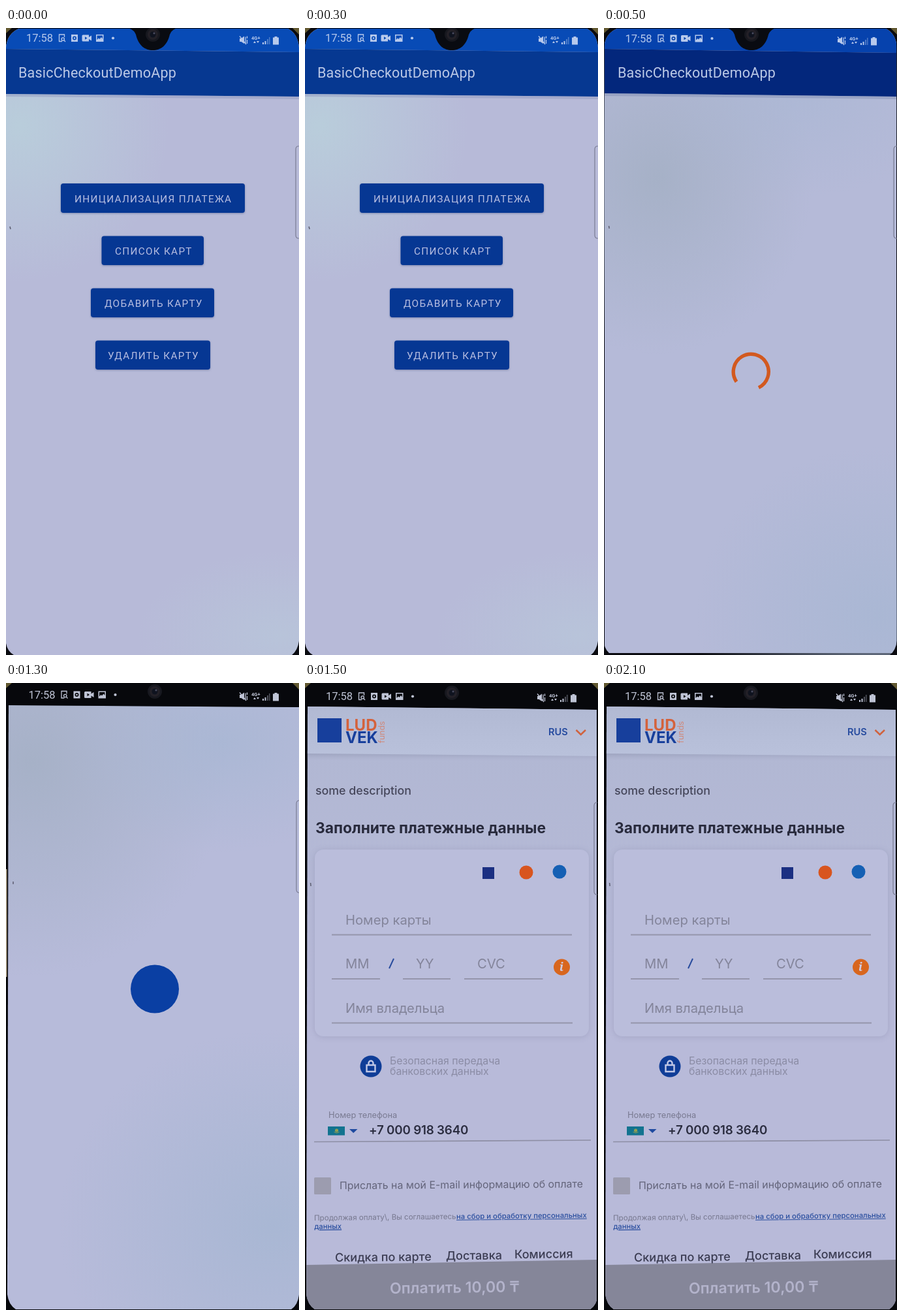
An HTML page that plays this animation: 449 px wide and 960 px high, repeating every 2500 ms.

```html
<!DOCTYPE html>
<html lang="ru">
<head>
<meta charset="utf-8">
<title>Checkout demo</title>
<style>
html, body { margin: 0; width: 100%; height: 100%; overflow: hidden; background: #07080c; }
svg { display: block; width: 100%; height: 100%; }
text { font-family: Inter, "Open Sans", sans-serif; white-space: pre; }
.ui { font-family: Roboto, "Noto Sans", sans-serif; }
.scene { visibility: hidden; animation: short 2.5s step-end infinite; }
.loading { animation-delay: .5s; }
.splash { animation-delay: 1s; }
.form { animation-name: long; animation-delay: 1.5s; }
@keyframes short { 0% { visibility: visible; } 20% { visibility: hidden; } }
@keyframes long { 0% { visibility: visible; } 40% { visibility: hidden; } }
.title { font-size: 21.5px; letter-spacing: .2px; fill: #bcc9e7; }
.btn rect { fill: #063793; filter: drop-shadow(0 1px 1.5px #4a5a8a88); }
.btn text { font-size: 15.3px; letter-spacing: 1.3px; fill: #b9bfe2; }
.field text { font-size: 20.2px; fill: #83849a; }
.field path { stroke: #9595ab; stroke-width: 2; fill: none; }
.tabs text { font-size: 18.1px; font-weight: 500; fill: #3b3c52; }
.speck { stroke: #5c5d70; stroke-width: 1.5; }
</style>
</head>
<body>
<svg viewBox="0 0 449 960" preserveAspectRatio="none">
  <defs>
    <clipPath id="screen"><path d="M20 1H432Q447 8 449 30V938Q447 953 438 960H12Q2 954 0 942V30Q2 8 20 1Z"/></clipPath>
    <clipPath id="inset"><path d="M4 33H449V936Q447 953 437 959H15Q4 952 2 936Z"/></clipPath>
    <radialGradient id="glow"><stop offset="0" stop-color="#b9cddb"/><stop offset="1" stop-color="#b9cddb" stop-opacity="0"/></radialGradient>
    <radialGradient id="grey"><stop offset="0" stop-color="#a6b1c7"/><stop offset="1" stop-color="#a6b1c7" stop-opacity="0"/></radialGradient>
    <radialGradient id="cool"><stop offset="0" stop-color="#a5b6d2"/><stop offset="1" stop-color="#a5b6d2" stop-opacity="0"/></radialGradient>
    <linearGradient id="page" x2="0" y2="1"><stop offset="0" stop-color="#b0b7d2"/><stop offset=".5" stop-color="#b8bad9"/></linearGradient>
    <linearGradient id="bar" x2="0" y2="1"><stop offset="0" stop-color="#b1b9d3"/><stop offset="1" stop-color="#b9c1db"/></linearGradient>
    <linearGradient id="fade" x2="0" y2="1"><stop offset="0" stop-color="#8f95b0"/><stop offset="1" stop-color="#b7bad8" stop-opacity="0"/></linearGradient>

    <g id="left">
      <text class="ui" x="31" y="21" font-size="16.5" fill="currentColor">17:58</text>
      <g fill="none" stroke="currentColor" stroke-width="1.3">
        <path d="M86 20.5H81.5V10H89.5V14"/><circle cx="87.2" cy="17" r="2.2"/><path d="M88.8 18.6L91 21"/>
      </g>
      <g fill="currentColor" fill-rule="evenodd">
        <path d="M100 10H110V21H100ZM105 12.5A3 3 0 1 0 105 18.5A3 3 0 1 0 105 12.5Z"/><circle cx="105" cy="15.5" r="1.3"/>
        <path d="M118 10.5H127V14L131 11.5V19.5L127 17V20.5H118Q116.5 20.5 116.5 19V12Q116.5 10.5 118 10.5ZM121 13.3V17.7L124.5 15.5Z"/>
        <path d="M138 10H149.5V21H138ZM139.5 11.5V18L142 15.5L143.5 17L146 14L148 16.5V11.5Z"/>
        <circle cx="164" cy="15.5" r="2.1"/>
      </g>
    </g>
    <g id="right" fill="currentColor">
      <path d="M358 16H360.5L365 12.5V24L360.5 21H358Z"/>
      <path d="M358 12.5L368 25M367 13.5V23M369.5 12.5V16M369.5 18V24" stroke="currentColor" stroke-width="1.3"/>
      <text class="ui" x="376" y="18" font-size="7.5" font-weight="700">4G+</text>
      <path d="M379 23L381 20L383 23ZM384 20H388L386 23Z"/>
      <path d="M393 25V22H395V25ZM396.5 25V20H398.5V25Z"/>
      <path d="M400 25V17H402V25ZM403 25V14H404.5V25Z" opacity=".4"/>
      <path d="M411.5 13H415.5V14.5H418V25.5H409V14.5H411.5Z"/>
    </g>
    <g id="camera"><circle r="11" fill="#17181f"/><circle r="8" fill="#232027"/><circle r="4.5" fill="#0f131f"/><circle cx="2" cy="-2" r="1.5" fill="#4b4d61"/></g>
    <path id="notch" d="M186 0Q196 2 199 10C203 27 213 34 225 34S247 27 251 10Q254 2 263 0Z" fill="#090b11"/>
    <path id="edge" d="M449 181H447Q444 182 444 186V317Q444 321 447 322H449" fill="none" stroke="#7b7d94" stroke-width="1.2"/>
    <path id="corners" d="M0 0H9L0 8ZM449 0H439L449 10Z" fill="#635a32"/>
  </defs>

  <g class="scene menu">
    <rect width="449" height="960" fill="#0a0b10"/><use href="#corners"/>
    <g clip-path="url(#screen)">
      <rect width="449" height="960" fill="#b7bad8"/>
      <ellipse cx="20" cy="150" rx="230" ry="240" fill="url(#glow)"/>
      <ellipse cx="420" cy="930" rx="220" ry="130" fill="url(#glow)" opacity=".5"/>
      <path d="M0 0H449V37L0 32Z" fill="#084bb6"/>
      <path d="M0 32L449 37V105L0 101Z" fill="#063891"/>
      <path d="M0 101L449 105V109L0 105Z" fill="#8f9abf" opacity=".5"/>
      <use href="#notch"/>
    </g>
    <use href="#camera" x="225" y="10"/>
    <use href="#left" color="#b7c9ec"/><use href="#right" color="#b7c9ec"/>
    <text class="ui title" x="19" y="76">BasicCheckoutDemoApp</text>
    <g class="btn">
      <rect x="84" y="238" width="282" height="45" rx="4"/><text class="ui" x="105" y="267">ИНИЦИАЛИЗАЦИЯ ПЛАТЕЖА</text>
      <rect x="146.5" y="318.5" width="156.5" height="44.5" rx="4"/><text class="ui" x="167" y="347">СПИСОК КАРТ</text>
      <rect x="130" y="398.5" width="189" height="44.5" rx="4"/><text class="ui" x="151" y="427">ДОБАВИТЬ КАРТУ</text>
      <rect x="137" y="478.5" width="176" height="44.5" rx="4"/><text class="ui" x="156" y="507">УДАЛИТЬ КАРТУ</text>
    </g>
    <use href="#edge"/>
    <path class="speck" d="M6 304L7 308"/>
  </g>

  <g class="scene loading">
    <rect width="449" height="960" fill="#0a0b10"/><use href="#corners"/>
    <g clip-path="url(#screen)">
      <rect x="1" width="447" height="957" fill="#b5bad8"/>
      <ellipse cx="80" cy="230" rx="240" ry="270" fill="url(#grey)"/>
      <ellipse cx="300" cy="100" rx="230" ry="160" fill="url(#cool)" opacity=".5"/>
      <ellipse cx="420" cy="900" rx="280" ry="260" fill="url(#cool)" opacity=".7"/>
      <path d="M1 0H448V38L1 32Z" fill="#0642ad"/>
      <path d="M1 32L448 38V105L1 100Z" fill="#03277c"/>
      <path d="M1 100L448 105V109L1 104Z" fill="#8490b5" opacity=".5"/>
      <use href="#notch" x="1"/>
    </g>
    <use href="#camera" x="226" y="10"/>
    <use href="#left" x="1.5" y=".5" color="#b7c9ec"/><use href="#right" y="1" color="#b7c9ec"/>
    <text class="ui title" x="21" y="76">BasicCheckoutDemoApp</text>
    <path d="M203 541.6A27 27 0 1 1 237 550.6" fill="none" stroke="#d2591f" stroke-width="5.4"/>
    <use href="#edge"/>
    <path class="speck" d="M7.5 303L8 307"/>
  </g>

  <g class="scene splash">
    <rect width="449" height="960" fill="#07080c"/><use href="#corners"/>
    <path d="M.7 285V450" stroke="#b7a78b" stroke-width="1.4"/>
    <g clip-path="url(#inset)">
      <path d="M2 34L449 37V960H2Z" fill="#b7bbda"/>
      <ellipse cx="40" cy="120" rx="300" ry="330" fill="url(#grey)"/>
      <ellipse cx="330" cy="90" rx="240" ry="170" fill="url(#cool)" opacity=".7"/>
      <ellipse cx="410" cy="830" rx="330" ry="300" fill="url(#cool)" opacity=".8"/>
    </g>
    <path d="M0 30H449V37L0 34Z" fill="#07080c"/>
    <use href="#camera" x="228" y="13"/>
    <use href="#left" x="3.5" y="2.5" color="#bfc4d5"/><use href="#right" y="2" color="#bfc4d5"/>
    <circle cx="228" cy="468.5" r="37" fill="#0a3fa3"/>
    <use href="#edge" x="1" y="-1"/>
    <path class="speck" d="M11 304V308"/>
  </g>

  <g class="scene form">
    <rect width="449" height="960" fill="#07080c"/><use href="#corners"/>
    <g clip-path="url(#inset)">
      <path d="M2 36L447 41V960H2Z" fill="url(#page)"/>
      <path d="M2 36L447 41V112L2 108Z" fill="url(#bar)"/>
      <path d="M2 108L447 112V122L2 118Z" fill="url(#fade)" opacity=".55"/>
      <rect x="15" y="255" width="420" height="286" rx="13" fill="#babddb" style="filter:drop-shadow(0 1px 5px #8d90b077)"/>
      <path d="M2 891L447 883V960H2Z" fill="#858699"/>
    </g>
    <use href="#camera" x="225" y="15"/>
    <use href="#left" x="1" y="5" color="#bfc4d5"/><use href="#right" x="-2" y="4" color="#bfc4d5"/>

    <rect x="19" y="54" width="37" height="37" fill="#173f9c"/>
    <g font-size="24" font-weight="700">
      <text x="62" y="73" fill="#d4623c">LUD</text><text x="62" y="92" fill="#173f9c">VEK</text>
    </g>
    <text transform="translate(122 92) rotate(-90)" font-size="12.5" fill="#cf8a7c">funds</text>
    <text x="373" y="80" font-size="14.6" font-weight="600" fill="#254a9e">RUS</text>
    <path d="M415.5 72L422.7 79L430 72" fill="none" stroke="#d0623e" stroke-width="2.5"/>

    <text x="16" y="171" font-size="17.8" font-weight="500" fill="#45465a">some description</text>
    <text x="16" y="230" font-size="22.8" font-weight="700" fill="#282a3c">Заполните платежные данные</text>

    <rect x="272" y="282" width="18" height="18" fill="#1b2f82"/>
    <circle cx="339" cy="290" r="10.5" fill="#d8551f"/>
    <circle cx="390" cy="289" r="10.5" fill="#1560b4"/>

    <g class="field">
      <text x="62" y="370">Номер карты</text>
      <text x="62" y="437">MM</text><text x="170" y="437">YY</text><text x="264" y="437">CVC</text>
      <text x="62" y="505">Имя владельца</text>
      <path d="M41 385.5H409M41 453H115M150 453H223M244 453H364.5M41 520.5H410"/>
    </g>
    <path d="M129 437L136 422" stroke="#294c9d" stroke-width="2"/>
    <circle cx="393.5" cy="435" r="12.5" fill="#d8661e"/>
    <text x="393" y="441" text-anchor="middle" style="font:italic 700 18px 'Noto Serif',serif" fill="#cfcbe0">i</text>

    <circle cx="101" cy="587" r="16.5" fill="#0f3d97"/>
    <path d="M94.5 585H107.5V595H94.5ZM97.5 585V582A3.5 3.5 0 0 1 104.5 582V585" fill="none" stroke="#c1c8e6" stroke-width="2.4"/>
    <g font-size="15.8" fill="#8b8ca5"><text x="130" y="584">Безопасная передача</text><text x="130" y="600">банковских данных</text></g>

    <text x="36" y="666" font-size="12.8" fill="#797a91">Номер телефона</text>
    <rect x="35" y="679" width="26" height="13.5" fill="#12738f"/>
    <circle cx="48.5" cy="685" r="2.6" fill="#8f9f55"/><path d="M44.5 687.5Q48.5 690.5 52.5 687.5" fill="none" stroke="#8f9f55"/>
    <path d="M68 683H80.5L74.2 689Z" fill="#1e4a9f"/>
    <text x="98" y="691" font-size="18.8" font-weight="600" letter-spacing="-.2" fill="#2b2d40">+7 000 918 3640</text>
    <path d="M14 702.5L438 700" stroke="#8d8ea4" stroke-width="1.7"/>

    <rect x="14" y="757" width="26" height="26" rx="1.5" fill="#9c9caf"/>
    <text transform="translate(53 775) rotate(-.4)" font-size="15.9" fill="#63647a">Прислать на мой E-mail информацию об оплате</text>
    <g transform="translate(14 823) rotate(-.6)">
      <text font-size="11.6" fill="#77788f">Продолжая оплату\, Вы соглашаетесь</text>
      <g font-size="11.3" font-weight="500" fill="#2b4f9f" text-decoration="underline"><text x="218">на сбор и обработку персональных</text><text y="13">данных</text></g>
    </g>
    <g class="tabs" transform="rotate(-.6 46 886)">
      <text x="46" y="886">Скидка по карте</text><text x="216" y="885">Доставка</text><text x="321" y="884">Комиссия</text>
    </g>
    <text transform="translate(130 935) rotate(-.8)" font-size="23.2" font-weight="600" fill="#b3b3cb">Оплатить 10,00 ₸</text>
    <use href="#edge" x="-1" y="2"/>
    <path class="speck" d="M8.5 306L9 311"/>
  </g>
</svg>
</body>
</html>
```
